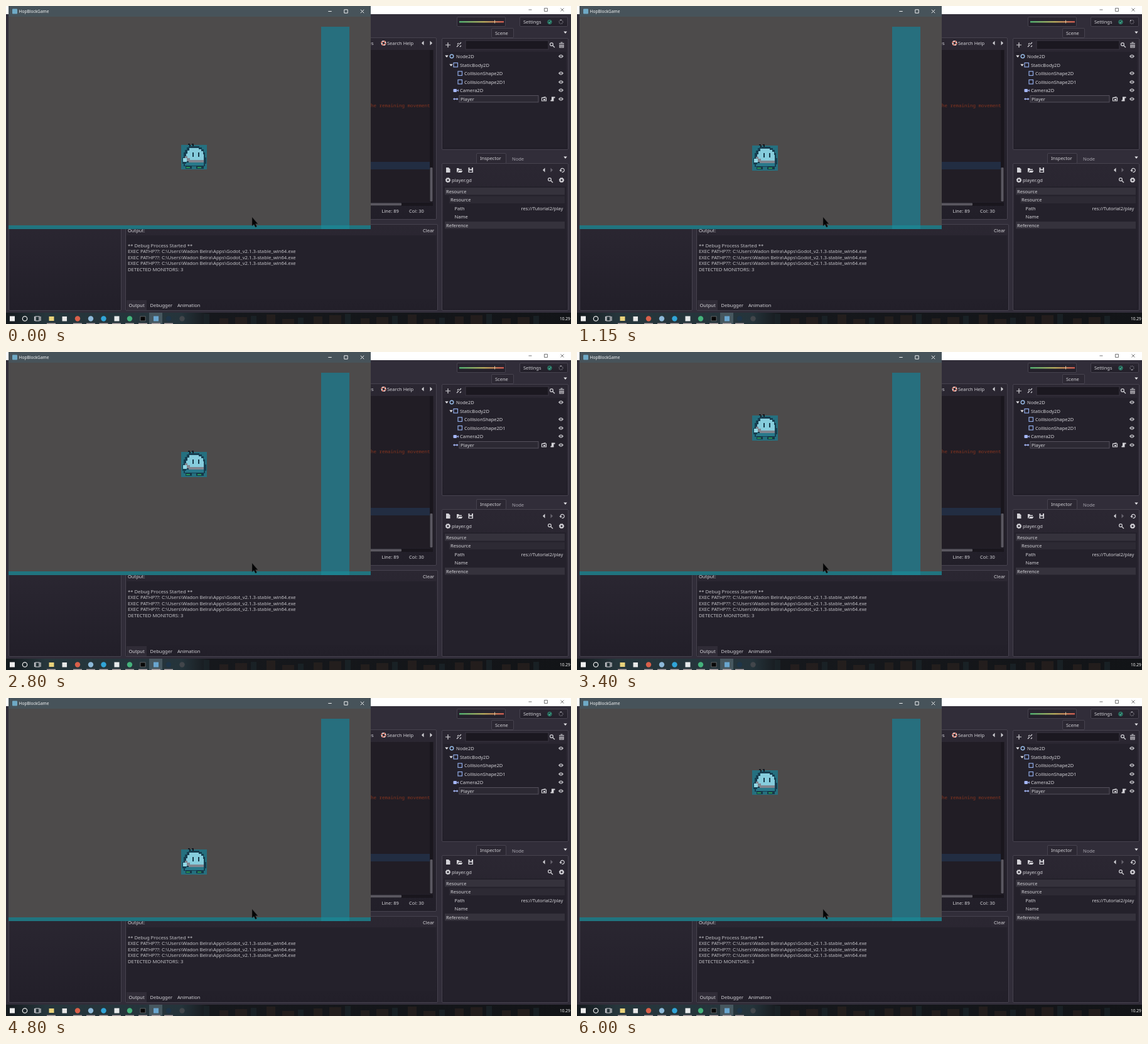
Recreate the animation shown at these times as an HTML page. Size 900 by 506 pixels, loop 6050 ms.

```html
<!DOCTYPE html>
<html lang="en">
<head>
<meta charset="utf-8">
<title>Jumping box</title>
<style>
html, body { margin: 0; width: 100%; height: 100%; overflow: hidden; background: #312d39; }
svg { display: block; width: 900px; height: 506px; }
text { font: 7.5px "Noto Sans", "Open Sans", sans-serif; fill: #d4d3d8; }
.mono { font: 7.5px "Noto Sans Mono", "DejaVu Sans Mono", monospace; fill: #85341f; }
.line { fill: none; stroke: #d4d3d8; stroke-width: 1.2; }
</style>
</head>
<body>
<svg id="stage" viewBox="0 0 900 506">
  <defs>
    <linearGradient id="panel" x2="0" y2="1">
      <stop stop-color="#2b2732"/><stop offset="1" stop-color="#221f29"/>
    </linearGradient>
    <linearGradient id="meter">
      <stop stop-color="#4fae70"/><stop offset=".55" stop-color="#b5a95c"/><stop offset="1" stop-color="#c9574f"/>
    </linearGradient>
    <linearGradient id="bar">
      <stop stop-color="#14191d"/><stop offset=".07" stop-color="#26363c"/>
      <stop offset=".31" stop-color="#25343b"/><stop offset=".36" stop-color="#16181c"/>
      <stop offset="1" stop-color="#121417"/>
    </linearGradient>
  </defs>
  <g id="editor"></g>
  <g id="game"></g>
  <g id="player" shape-rendering="crispEdges">
    <path fill="#25707f" d="M0 0H41V39.5H0Z"/>
    <path fill="#151b22" d="M11-2h3v2h-3zM17-2h3v2h-3zM13 0h2v2h-2zM18 0h2v2h-2z"/>
    <path fill="#173e50" d="M12 2H29V4H33V7H36V12H38V20H40V30H38V34H4V30H2V20H4V12H6V8H9V4H12Z"/>
    <path fill="#86cddd" d="M13 5H28V7H32V10H35V15H36V24H8V14H10V9H13Z"/>
    <path fill="#81858f" d="M6 18H10V21H14V24H36V28H12V26H8V23H6Z"/>
    <path fill="#28798b" d="M8 28H36V33H6V30H8Z"/>
    <path fill="#92d8e5" d="M3 21H9V27H3Z"/>
    <path fill="#173848" d="M18 12H20V19H18ZM27 12H29V19H27ZM7 33H17V38H7ZM24 33H36V38H24Z"/>
    <path fill="#279858" d="M8 35H14V37H8ZM26 35H32V37H26Z"/>
  </g>
  <path fill="#050506" stroke="#333" stroke-width=".4" d="M392 336V350L395 347.2 397.3 352 399.5 351 397.3 346.4H401Z"/>
</svg>
<script>
const LOOP = 6050, STEP = 50;
const FLIGHT = 859, HEIGHT = 227, GROUND = 309;
const LAUNCHES = [-765, 146, 1058, 2120, 3095, 4011, 4872, 5734];
const $ = id => document.getElementById(id);

const rect = (x, y, w, h, fill, more = '') =>
  `<rect x="${x}" y="${y}" width="${w}" height="${h}" fill="${fill}" ${more}/>`;
const dot = (x, y, r, fill, more = '') => `<circle cx="${x}" cy="${y}" r="${r}" fill="${fill}" ${more}/>`;
const label = (x, y, s, more = '') => `<text x="${x}" y="${y}" ${more}>${s}</text>`;
const line = (d, more = '') => `<path class="line" d="${d}" ${more}/>`;
const panel = (x, y, w, h, fill = 'url(#panel)') =>
  rect(x + .5, y + .5, w - 1, h - 1, fill, 'rx="1.5" stroke="#46424e"');
const search = (x, y) => line(`M${x + 1} ${y + 1}l3 3`) + dot(x - 1, y - 1, 2.4, 'none', 'class="line"');
const gear = (x, y) => dot(x, y, 2.6, 'none', 'stroke="#d4d3d8" stroke-width="2"') +
  dot(x, y, 3.7, 'none', 'stroke="#d4d3d8" stroke-width="1" stroke-dasharray="1.5 1.4"');
const eye = y => `<path d="M880 ${y}Q884 ${y - 5.5} 888 ${y}Q884 ${y + 5.5} 880 ${y}Z" fill="#d4d3d8"/>` +
  dot(884, y, 1.8, '#25222c') + dot(884, y, .8, '#d4d3d8');
const down = (x, y) => `<path d="M${x - 2.7} ${y - 1.5}h5.4l-2.7 3.4z" fill="#e4e3e8"/>`;
const arrow = (x, y, d, fill = '#d4d3d8') => `<path d="M${x - d * 1.5} ${y - 3.5}v7l${d * 3.5}-3.5z" fill="${fill}"/>`;
const controls = (xs, y, color, r) => `<g fill="none" stroke="${color}">` +
  `<path d="M${xs[0] - r} ${y}h${2 * r}M${xs[2] - r} ${y - r}l${2 * r} ${2 * r}m0 ${-2 * r}l${-2 * r} ${2 * r}"/>` +
  `<path d="M${xs[1] - r} ${y - r}h${2 * r}v${2 * r}h${-2 * r}z"/></g>`;

function sceneDock() {
  const rows = [[717, 80, 'Node2D'], [723, 94, 'StaticBody2D'], [730, 107, 'CollisionShape2D'],
    [730, 121, 'CollisionShape2D1'], [723, 134, 'Camera2D'], [724, 148, 'Player']];
  return panel(694, 51, 202, 178) + panel(773, 35, 36, 16, '#2c2833') + label(779, 45.5, 'Scene') +
    down(891, 42) + line('M700 62h8M704 58v8') + search(870, 62) +
    line('M718 65l3-3M722 61l3-3M719 61l2-2M723 65l2-2', 'stroke-width="1.6"') +
    rect(732, 55, 132, 14, '#1b1820', 'stroke="#3a3642"') +
    line('M881 59.5h8M883.5 58h3M882 61v5h6v-5M884 61v4M886 61v4') +
    rect(697, 73, 195, 152, '#24212b') + rect(722, 142.5, 126, 10.5, '#2c2933', 'stroke="#55515c"') +
    rows.map(([x, y, s]) => label(x, y + 2.8, s)).join('') +
    [80, 107, 121, 134, 148].map(eye).join('') +
    down(702, 80) + down(709, 94) + dot(710, 80, 2.8, 'none', 'stroke="#99bde8" stroke-width="1.4"') +
    [[713, 90.5], [720, 104], [720, 117.5]].map(([x, y]) =>
      rect(x, y, 6.5, 6.5, 'none', 'stroke="#91ace8" stroke-width="1.2"')).join('') +
    rect(712.5, 132, 5.5, 5, '#a5b7f5', 'rx="1"') + '<path d="M718 134.5l2.8-2v4z" fill="#a5b7f5"/>' +
    '<path d="M712 148l2.5-2v1.3h3.5v-1.3l2.5 2-2.5 2v-1.3h-3.5v1.3z" fill="#a5b7f5"/>' +
    line('M853.5 146h7v5h-7zM853.5 146l6-1.5') + rect(856, 148, 3, 2, '#d4d3d8') +
    '<path d="M869 144.5h5.5v2h-2v5h-5v-2h1.5z" fill="#d4d3d8"/>';
}

function inspector() {
  return panel(694, 250, 202, 235) + panel(749, 234, 48, 17, '#2c2833') + label(755, 245, 'Inspector') +
    label(806, 245.5, 'Node', 'style="fill:#a9a7b0"') + down(891, 241) +
    '<path d="M701 257h4l2.500 2.500v5.500h-6.500z" fill="#d4d3d8"/>' +
    '<path d="M718 258h3l1 1.500h4v1.500h-5l-2 3.500h-1zM721.500 262h6l-2 3h-6z" fill="#d4d3d8"/>' +
    rect(736.5, 257, 7.5, 8, '#d4d3d8') + rect(738.5, 257, 3.5, 2.5, '#302c38') + rect(738, 261.5, 4.5, 2.5, '#302c38') +
    arrow(857, 261, -1) + arrow(869, 261, 1, '#68646f') +
    line('M883.500 262.500a3 3 0 1 1 2 1.800M882 261l1.500 2 2-1.500') + gear(704, 277) + label(710, 279.5, 'player.gd') +
    search(867, 277) + gear(885, 277) +
    rect(697, 287, 195, 194, '#24212b') +
    [289, 343].map(y => rect(699, y, 191, 11.5, '#35323c')).join('') + rect(706, 302.5, 184, 11.5, '#2d2a34') +
    label(701, 297.5, 'Resource') + label(708, 311, 'Resource') + label(714.5, 324.5, 'Path') +
    label(820.5, 324.5, 'res://Tutorial2/play') + label(714.5, 338, 'Name') + label(701, 351.5, 'Reference');
}

function scriptEditor() {
  return panel(420, 50, 266, 290) + label(570, 61.8, 'Files', 'text-anchor="start"') +
    dot(601.5, 59, 3, 'none', 'stroke="#e8dedc" stroke-width="2"') +
    dot(601.5, 59, 3, 'none', 'stroke="#d05b4a" stroke-width="2" stroke-dasharray="2.300 2.400"') +
    label(607, 61.8, 'Search Help') + arrow(664, 59, -1) + arrow(677, 59, 1) +
    rect(420, 70, 261, 242, '#211d25') + rect(420, 248, 255, 12, '#222d42') +
    label(581, 161.3, 'he remaining movement', 'class="mono"') +
    rect(675, 70, 5, 242, '#19161d') + rect(675.5, 257, 4, 54, '#5b5861', 'rx="1"') +
    rect(420, 313, 260, 5, '#19161d') + rect(420, 313.5, 210, 4, '#5b5861', 'rx="1"') +
    label(598.5, 328.8, 'Line: 89') + label(642, 328.8, 'Col: 30');
}

function output() {
  const exec = String.raw`EXEC PATHP??: C:\Users\Wadon Belra\Apps\Godot_v2.1.3-stable_win64.exe`;
  const rows = ['** Debug Process Started **', exec, exec, exec, 'DETECTED MONITORS: 3'];
  return panel(4, 340, 180, 145) + panel(190, 347, 498, 138) + label(194, 359.500, 'Output:') +
    rect(660, 350, 26, 14, '#2c2833') + label(664, 359.5, 'Clear') +
    rect(192, 365, 493, 102, '#24212b') + rect(192, 468, 32, 16, '#302c37') +
    rows.map((s, i) => label(194, 383.6 + i * 9.6, s, 'style="font-size:7.7px;fill:#c3c2c7"')).join('') +
    label(195.5, 478.5, 'Output') + label(229.5, 478.5, 'Debugger') + label(273, 478.5, 'Animation');
}

function taskbar() {
  const circles = [[114, '#d9604a'], [135, '#8db9d9'], [155.5, '#31a5d8'], [197, '#45b37c'], [259, '#1e3549'], [280.5, '#42464b']];
  let s = rect(0, 488, 900, 18, 'url(#bar)');
  for (let i = 0; i < 22; i++)
    s += rect(315 + i * 25, 490 + i * 7 % 9, 9 + i * 5 % 15, 16, i % 3 ? '#2b2320' : '#1c272b', 'opacity=".65"');
  s += rect(228, 488, 21, 18, '#46575f') + rect(6, 493.5, 8, 8, '#eee') +
    dot(30, 497.5, 3.7, 'none', 'stroke="#eee" stroke-width="1.2"') +
    line('M47 494h6v7h-6zM45.500 494v7M55 494v7') +
    rect(68.5, 494, 8, 7, '#e9d27b') + rect(89.5, 494, 7.5, 7.5, '#e8e8e8') +
    rect(172.5, 493.5, 8, 8, '#e6e9ea') + rect(214, 494, 8, 7, '#080808', 'stroke="#8a8a8a" stroke-width=".6"') +
    rect(235, 493.5, 8, 8, '#6aa6cf');
  s += circles.map(([x, c]) => dot(x, 497.5, 4.2, c)).join('');
  s += [72, 114, 135, 155.5, 176, 197, 218, 239, 259].map(x => rect(x - 7, 504.6, 14, 1.4, '#b7a8aa')).join('');
  return s + label(882, 500, '10.29', 'style="font-size:6.5px;fill:#f2f2f2"');
}

function toolbar() {
  return rect(0, 0, 900, 13, '#fff') + controls([835, 860, 886], 6, '#777', 2.5) +
    panel(718, 17, 78, 16) + rect(722, 24, 71, 2.5, 'url(#meter)') + rect(778, 22.5, 1, 5, '#d6c8a0') +
    panel(818, 17, 77, 16) + label(824, 28, 'Settings') +
    dot(866, 25.5, 3.2, '#1d4a42', 'stroke="#329079"') + line('M864.500 25.500l1.300 1.500 2.300-3', 'style="stroke:#4bb69a"') +
    '<g id="spinner">' + dot(884, 25.3, 3, 'none', 'stroke="#85828c" stroke-width="1.2" stroke-dasharray="1.2 1.156"') +
    dot(884, 22.3, .9, '#c5c3ca') + '</g>';
}

$('editor').innerHTML = rect(0, 0, 900, 506, '#312d39') + toolbar() + scriptEditor() +
  sceneDock() + inspector() + output() + taskbar();

$('game').innerHTML = rect(4, 0, 577, 355, '#4d4b4b') + rect(4, 0, 577, 17, '#47535a') +
  rect(10, 4.5, 8, 8, '#6fa9c5', 'rx="1"') +
  label(20.5, 11.2, 'HopBlockGame', 'style="font-size:6.6px;fill:#f1f3f4"') +
  controls([516, 541.5, 567.5], 8.5, '#eceeef', 2.7) +
  rect(502, 33, 45, 322, '#276f7e') + rect(4, 349, 577, 6, '#20747f') + rect(502, 349, 45, 6, '#1d8290');

function draw(now) {
  const t = Math.floor(now % LOOP / STEP) * STEP;
  const start = LAUNCHES.filter(l => l <= t).pop();
  const u = Math.min((t - start) / FLIGHT, 1);
  const y = GROUND - 4 * HEIGHT * u * (1 - u);
  $('player').setAttribute('transform', `translate(278.700 ${y.toFixed(2)})`);
  $('spinner').setAttribute('transform', `rotate(${t / STEP * 45} 884 25.3)`);
}

const begin = performance.now();
function tick() {
  draw(performance.now() - begin);
  requestAnimationFrame(tick);
}
tick();
</script>
</body>
</html>
```
